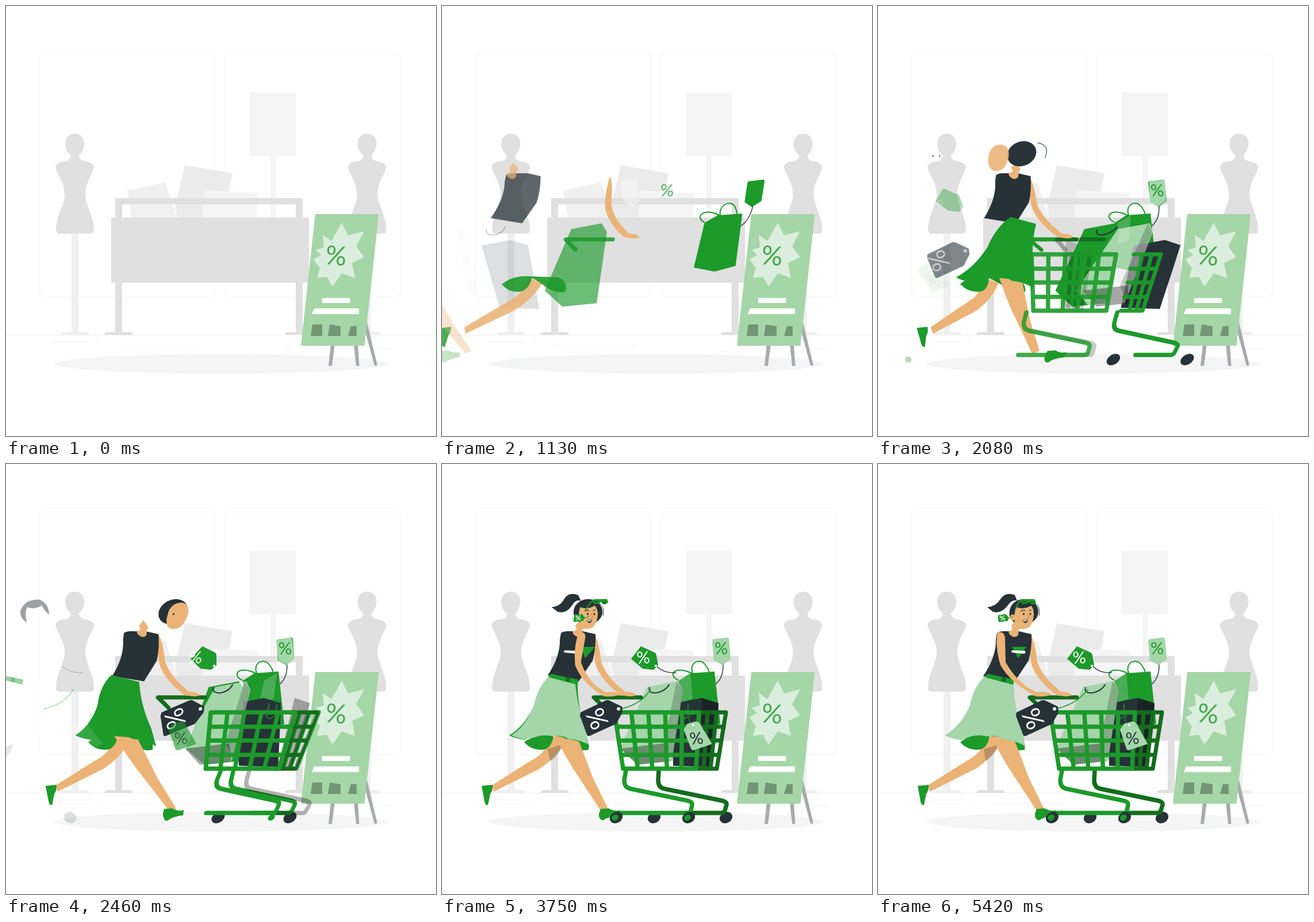
These frames come from a looping animation (748 by 748 pixels, 5.54 s). An HTML page with a canvas:

```html
<!DOCTYPE html>
<html lang="en">
<head>
<meta charset="utf-8">
<title>Shopping sale</title>
<style>
html, body { margin: 0; width: 100%; height: 100%; overflow: hidden; background: #fff; }
canvas { display: block; width: 748px; height: 748px; }
</style>
</head>
<body>
<canvas id="stage" width="748" height="748"></canvas>
<script>
const ctx = document.getElementById('stage').getContext('2d');
const LOOP = 5540, QUIET = 420, TRAVEL = 374;
const GREEN = '#1c9a2a', DEEP = '#146b1d', DARK = '#263238', SKIN = '#ebb376';
const VEIL = 'rgba(255,255,255,.6)', LIGHT = '#a5d6a7';
const shade = a => `rgba(0,0,0,${a})`;

function paint(color, d, width) {
  const path = new Path2D(d);
  if (width) {
    ctx.strokeStyle = color;
    ctx.lineWidth = width;
    ctx.lineCap = ctx.lineJoin = 'round';
    ctx.stroke(path);
  } else {
    ctx.fillStyle = color;
    ctx.fill(path);
  }
}

function oval(color, x, y, rx, ry = rx, turn = 0) {
  ctx.fillStyle = color;
  ctx.beginPath();
  ctx.ellipse(x, y, rx, ry, turn, 0, 7);
  ctx.fill();
}

function percent(color, x, y, size, turn = 0, weight = 400) {
  ctx.save();
  ctx.translate(x, y);
  ctx.rotate(turn);
  ctx.font = `${weight} ${size}px Lato, sans-serif`;
  ctx.textAlign = 'center';
  ctx.fillStyle = color;
  ctx.fillText('%', 0, size * .36);
  ctx.restore();
}

// Scenery

function mannequin(dx) {
  ctx.save();
  ctx.translate(dx, 0);
  paint('#f0f0f0', 'M114 396h12v171h12q6 0 7 5h-50q1-5 7-5h12z');
  paint('#e0e0e0', 'M120 222C130 222 137 230 136 242C135 251 131 256 127 260Q127 267 135 270Q151 271 153 280C150 295 137 308 138 330C139 348 153 365 153 390Q153 396 146 396H94Q87 396 87 390C87 365 101 348 102 330C103 308 90 295 86 280Q88 271 104 270Q113 267 113 260C109 256 103 251 103 240C103 229 110 222 120 222Z');
  ctx.restore();
}

function scenery() {
  ctx.fillStyle = '#fff';
  ctx.fillRect(0, 0, 748, 748);
  ctx.strokeStyle = '#f5f5f5';
  ctx.lineWidth = 1.2;
  for (const x of [57.5, 381]) {
    ctx.beginPath();
    ctx.roundRect(x, 83, 305.5, 422.5, 8);
    ctx.stroke();
  }
  paint('#f0f0f0', 'M0 572.5H748', 1);
  paint('#f5f5f5', 'M80 585H143M155 585H166M197 591.5H336M482 600.5H495M640 596H672', 1);
  paint('#f5f5f5', 'M424 151h80.5v110H469V368H460V261H424z');
  mannequin(0);
  mannequin(508.5);
  paint('#f0f0f0', 'M211 321L277 307L297 368H219Z');
  paint('#ebebeb', 'M311 277L394 291L378 368H298L294 352Z');
  paint('#f5f5f5', 'M346 321L438 325L436 368H341Z');
  paint('#e0e0e0', 'M183 368H190V334H516V368H527V481.5H516V567H528Q534 567 535 572H485Q486 567 492 567H504V481.5H202V567H214Q220 567 221 572H171Q172 567 178 567H190V481.5H183ZM202 345V368H504V345Z');
  oval('#f5f5f5', 374, 622.5, 290, 17);
  paint('#a6abad', 'M565 588H572L567 626H561ZM605 588H612L614.5 626H609ZM626 542L646 625L641 626L622 555Z');
  paint(LIGHT, 'M538 362H648.5L623.5 591H513Z');
  paint('#dbeedd', 'M584 377L595 399L623 392L609 418L623 437L602 447L607 473L584 465L568 488L558 471L541 473L546 456L535 441L548 433L539 424L553 420L551 398L566 409Z');
  ctx.save();
  ctx.transform(1, 0, -.02, 1, 9, 0);
  percent('#43a84d', 574, 434, 46, .08);
  ctx.restore();
  paint('#fff', 'M550 508H598.5V516.5H550ZM536 526H614V536H532Z');
  paint('#719575', 'M533 554H550V574H530ZM563 554L582 557V574H560ZM600 557H610V574H595Z');
}

// Parts in painting order: time of entry, height of the skew axis, drawing

const parts = [];
const add = (start, axis, draw) => parts.push({ start, axis, draw });

// Vertical middle of a path in absolute commands
function midY(d) {
  const ys = [];
  for (const [, cmd, args] of d.matchAll(/([A-Z])([^A-Z]*)/g)) {
    (args.match(/[\d.]+/g) || []).forEach((v, i) => {
      if (cmd === 'V' || (cmd !== 'H' && i % 2)) ys.push(+v);
    });
  }
  return (Math.min(...ys) + Math.max(...ys)) / 2;
}

const shape = (start, color, d, width, axis = midY(d)) =>
  add(start, axis, () => paint(color, d, width));

// Green bag with tag
const BAG = 382;
const tag = 'M471 305L496 302Q499 302 499 305L502 339L488 350L473 341L470 308Z';
shape(280, DARK, 'M489 346Q490 372 476 383', 1.4, BAG);
shape(280, GREEN, tag, 0, BAG);
shape(600, VEIL, tag);
add(500, 320, () => percent(GREEN, 485.5, 320.5, 29));
shape(280, GREEN, 'M437 366C427 346 450 334 460 352Q466 360 464 366M411 376C394 368 402 354 424 360Q432 362 438 367', 2, BAG);
shape(280, GREEN, 'M412 377L432 364L474 361L484 452L450 462L412 455Z', 0, BAG);
shape(1250, 'rgba(255,255,255,.2)', 'M412 377L432 364L436 408L413 416Z');

// Black bag
shape(870, DARK, 'M400 417L452 407L481 416L478 450L470 527L402 525Z');
shape(1500, shade(.3), 'M452 407L481 416L470 527L450 524Z');
shape(1300, GREEN, 'M414 417V438Q420 448 428 438V418', 1.5);

// Pale bag
const paleBag = 'M357 388L410 378L419 393L400 517L340 523L310 495Z';
shape(560, GREEN, paleBag);
shape(1000, VEIL, paleBag);
shape(1000, shade(.2), 'M408 378L419 393L402 512L386 486Z');
shape(1040, shade(.35), 'M310 495L386 486L394 517L340 523Z');
shape(800, DARK, 'M361 389C356 403 385 401 395 384', 2);

// Cart, far side
const handle = 'M283 424L264 406H346';
const farLeg = 'M377 533L376 550Q376 563 387 565L484 585Q496 587 495 593L492 603Q491 607 486 607H425';
const sideBars = 'M447 432H494L478 530H440M445 457H490M444 481H486M442 506H482M462 432L455 530M478 432L467 530';
shape(456, GREEN, handle, 7);
shape(980, shade(.3), handle, 7);
shape(1285, GREEN, sideBars, 7);
shape(1500, shade(.3), sideBars, 7);
[494, 369].forEach((x, i) =>
  add(1050 + i * 40, 615, () => oval(DARK, x, 615, 11.5, 9.5, -.5)));
shape(1150, GREEN, farLeg, 7.5);
shape(1490, shade(.3), farLeg, 7.5);

// Shopper
shape(378, SKIN, 'M265 296Q273 308 277 345Q285 365 300 380L318 396L326 403H312Q280 380 268 352Q262 330 265 296ZM310 397Q330 394 338 402Q330 406 318 403Z');
shape(450, SKIN, 'M190 473L214 482Q200 510 170 530L90 570L87 559Q140 525 165 510Q182 498 190 473Z');
shape(1990, shade(.2), 'M184 496L212 487Q205 505 187 517Z');
shape(480, GREEN, 'M69 560L88 558Q89 567 84 574L80 593Q75 594 74 587Z');
shape(445, GREEN, 'M143 484Q160 469 185 470L240 472Q258 480 255 497Q240 501 222 490Q205 478 194 473Q190 499 170 497Q155 497 143 484Z');
shape(740, SKIN, 'M196 473L236 477Q246 502 262 545L289 600L277 605Q255 570 228 530Q210 500 196 473Z');
shape(790, GREEN, 'M276 600L290 599Q300 605 310 602L308 611Q290 613 280 620Q272 618 273 608Z');
shape(505, DARK, 'M207 294Q213 290 226 291L245 291L267 296Q268 320 262 342L238 378L183 369Q206 335 205 305Z');
shape(534, SKIN, 'M232 281L240 272L248 284L244 290Q246 301 236 301Q228 298 227 292L234 288Z');
const skirt = 'M189 367L236 379Q235 420 250 460L256 491Q238 480 215 478Q205 470 190 474Q170 468 145 480Q128 478 117 472Q145 455 160 420Q167 385 189 367Z';
shape(840, GREEN, skirt);
shape(1930, VEIL, skirt);
shape(2005, GREEN, 'M191 365L237 375L235 384L186 371Z');
shape(2005, shade(.3), 'M216 370L223 372L221 380L215 378Z');

// Head
add(1270, 257, () => oval(DARK, 254, 257, 25, 22));
shape(1220, DARK, 'M262 238Q285 242 280 264', 1);
shape(1360, SKIN, 'M236 258Q238 242 255 241Q271 243 271 262Q269 287 252 287Q239 287 236 270Z');
shape(2000, DARK, 'M229 255Q240 234 265 236Q280 244 278 262Q271 256 267 246Q254 254 241 249Q235 262 238 276Q226 268 229 255Z');
shape(2130, DARK, 'M190 249Q205 248 213 235Q222 222 238 228L242 238Q235 235 228 243Q215 262 200 257Z');
add(2070, 267, () => oval(SKIN, 234, 267, 4.5, 5.5));
add(1550, 261, () => {
  oval(DARK, 253.5, 261, 1.5, 2);
  oval(DARK, 265, 261, 1.4, 2);
});
add(2190, 262, () => {
  paint(DARK, 'M249 256Q252 253 256 255M263 255L267 254', 1.2);
  paint('#ce7f48', 'M259 260L263 267L259 268', 1);
  paint(DARK, 'M252 272L261 270Q260 278 254 276Z');
  paint('#fff', 'M253 272.5L260 271L259 273L254 274Z');
});

// Cart, near side
const slats = [1, 2, 3, 4].map(i => `M${300 + 29.4 * i} 432L${315 + 25.4 * i} 530`).join('');
shape(1350, GREEN, `M300 432H447L442 530H315ZM304 457H446M308 481H445M312 506H443${slats}`, 7.5);
shape(1400, GREEN, 'M320 533L317 550Q317 563 328 565L424 585Q436 587 435 593L433 603Q432 607 427 607H312', 7.5);
[303, 429].forEach((x, i) => {
  add(2220 - i * 20, 615, () => oval(DARK, x, 615, 11.5, 9.5, -.5));
  add(1690 - i * 180, 615, () => oval(GREEN, x - 2, 615, 6, 5, -.5));
});

// Loose tags
shape(2115, DARK, 'M374 352Q385 364 406 363', 1.4);
add(1660, 338, () => {
  paint(GREEN, 'M346 317L370 328Q373 330 373 333L376 350L368 358L349 356L329 339Z');
  oval('#fff', 372, 351, 2);
});
add(1690, 337, () => percent('#fff', 350, 336.5, 29, -.05));
shape(2065, GREEN, 'M308 426Q345 419 365 392', 1.4);
add(1545, 442, () => {
  paint(DARK, 'M241 432L285 411Q288 410 292 412L313 422L314 432L303 452L257 473Q253 474 252 470L240 438Z');
  oval('#fff', 307, 426, 3);
});
add(1560, 443, () => percent('#fff', 270, 443, 44, 1.15));
const lightTag = 'M421 462L428 452L442 448Q447 448 450 452L469 487L436 498Q433 498 432 495Z';
shape(2130, GREEN, 'M434 455Q425 443 435 432', 1.4);
shape(1900, GREEN, lightTag);
shape(2170, VEIL, lightTag);
add(2200, 454, () => oval('#fff', 437, 454, 2));
add(1900, 477, () => percent(DARK, 442.5, 477, 29, -.1));

// Finishing touches
add(2890, 245, () => {
  paint(GREEN, 'M238 255Q241 245 247 238', 2);
  paint(GREEN, 'M246 238L250 235H272L275 240Q273 245 267 244L262 240Q258 245 251 243Z');
  paint(DEEP, 'M250 238L260 238Q256 243 251 241ZM264 239L273 240Q270 243 266 242Z');
});
add(2865, 268, () => {
  paint(GREEN, 'M228 268L235 265', 1);
  paint(GREEN, 'M209 263L222 261L228 267L226 273L210 275Q208 269 209 263Z');
  percent('#fff', 216.5, 268, 12, -.1, 700);
});
shape(2910, GREEN, 'M233 318H258L244 338Z');
shape(2980, '#fff', 'M234 324L256 325Q257 330 254 330L233 328Q231 325 234 324Z');
shape(2870, SKIN, 'M208 293Q221 290 221 305L222 345Q235 368 255 385L275 397Q295 395 302 401Q290 406 274 404Q230 380 213 350Q203 315 208 293Z');

// Motion

const bez = (s, a, b) => 3 * (1 - s) ** 2 * s * a + 3 * (1 - s) * s * s * b + s ** 3;

function spring(x) {
  let lo = 0, hi = 1;
  for (let i = 0; i < 22; i++) {
    const s = (lo + hi) / 2;
    if (bez(s, .36, .5) < x) lo = s; else hi = s;
  }
  return bez(lo, -.01, 1.56);
}

// Fly in and lean back, then sway twice; the first parts are quicker
function pose(age, start) {
  const rise = Math.min(1350, 600 + 1.5 * start), sway = rise / 3;
  if (age < rise) {
    const e = spring(age / rise);
    return { shift: TRAVEL * (e - 1), skew: 20 - 30 * e, alpha: Math.min(1, Math.max(0, e)) };
  }
  const rest = (age - rise) / sway;
  let skew = 0;
  if (rest < 1) skew = -10 + 15 * spring(rest);
  else if (rest < 2) skew = 5 - 5 * spring(rest - 1);
  return { shift: 0, skew, alpha: 1 };
}

function frame(t) {
  scenery();
  if (t < QUIET) return;
  for (const { start, axis, draw } of parts) {
    if (t <= start) continue;
    const { shift, skew, alpha } = pose(t - start, start);
    const k = Math.tan(skew * Math.PI / 180);
    ctx.save();
    ctx.globalAlpha = alpha;
    ctx.transform(1, 0, k, 1, shift - k * axis, 0);
    draw();
    ctx.restore();
  }
}

let begin;
function step(now) {
  begin ??= now;
  frame((now - begin) % LOOP);
  requestAnimationFrame(step);
}
requestAnimationFrame(step);
</script>
</body>
</html>
```
